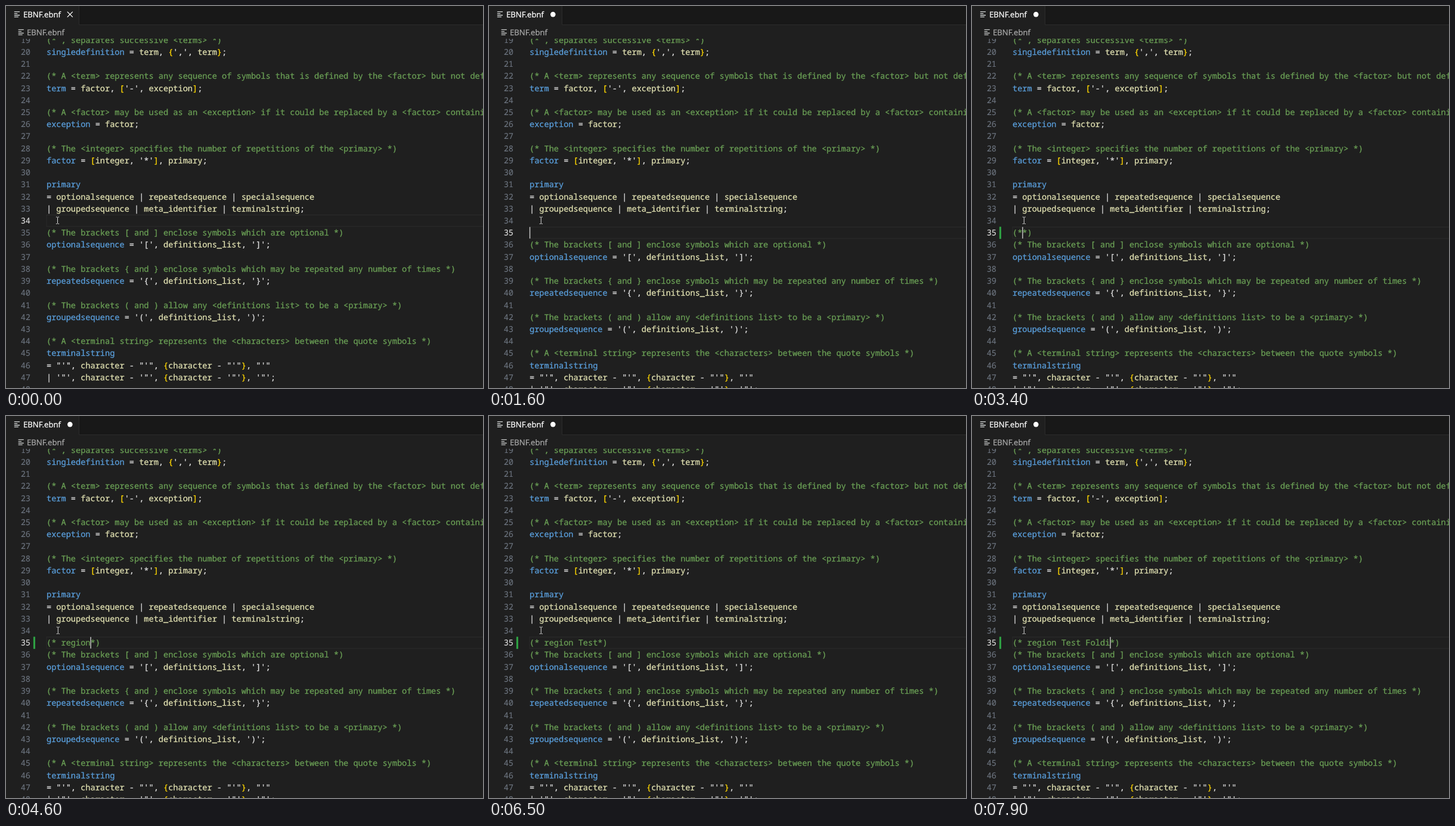
Animation of 800 by 641 pixels, one loop 8000 ms. Source, as an HTML page:

```html
<!DOCTYPE html>
<html lang="en">
<head>
<meta charset="utf-8">
<title>EBNF.ebnf</title>
<style>
  html, body { margin: 0; width: 100%; height: 100%; overflow: hidden; background: #1f1f1f; }
  svg { display: block; width: 100vw; height: 100vh; }
  text, tspan { fill: currentColor; stroke: currentColor; stroke-width: 0.3px; }
  text { white-space: pre; text-rendering: geometricPrecision; }
  .code { font: 13.625px "Noto Sans Mono", "DejaVu Sans Mono", monospace; color: #dcdcdc; }
  .ui { font: 13.1px "Open Sans", "Noto Sans", sans-serif; }
  .number { color: #6e7681; stroke-width: 0.1px; text-anchor: end; }
  .number.active { color: #e4e4e4; }
  .comment { color: #6a9f55; }
  .rule { color: #5a9fdc; }
  .name { color: #e2e2b2; }
  .bracket { color: #ffd700; }
</style>
</head>
<body>
<svg viewBox="0 0 800 641">
  <defs>
    <clipPath id="pane"><rect y="55" width="800" height="586"/></clipPath>
    <path id="fileIcon" d="M0 .7h9.2M0 3.6h5.4M0 6.5h9.2M0 9.4h7" stroke-width="1.3"/>
  </defs>
  <rect width="800" height="641" fill="#1f1f1f"/>
  <g clip-path="url(#pane)">
    <rect id="highlight" x="68" width="740" height="19.2" fill="none" stroke="#292929" stroke-width="1.3"/>
    <rect id="added" x="45.8" width="3.2" height="20.4" fill="#2ea043"/>
    <g id="numbers"></g>
    <g id="upper"></g>
    <g id="lower"></g>
    <text id="typed" x="68"></text>
    <rect id="caret" width="1.5" height="19.4" fill="#c4c4c4"/>
    <path id="pointer" d="M-2.6 -5.7h1.6l1 .8l1 -.8h1.6M0 -5v10M-2.6 5.7h1.6l1 -.8l1 .8h1.6" fill="none" stroke="#d8d8d8"/>
  </g>
  <rect x="122" width="678" height="31" fill="#181818"/>
  <path d="M122.5 0V31.5H800" fill="none" stroke="#2b2b2b"/>
  <use href="#fileIcon" x="13.8" y="9" stroke="#d4d7d6"/>
  <text class="ui" x="29" y="18.5" color="#fff">EBNF.ebnf</text>
  <path id="close" d="M102.8 9.6l9 9m0 -9l-9 9" stroke="#fff" stroke-width="1.3"/>
  <circle id="unsaved" cx="107.3" cy="14.1" r="4.3" fill="#fff"/>
  <use href="#fileIcon" x="20.6" y="39" stroke="#c4c6c5"/>
  <text class="ui" x="35" y="49" color="#a9a9a9">EBNF.ebnf</text>
</svg>
<script>
const LOOP = 8000, LEFT = 68, CHAR = 8.175, PITCH = 20.22;
const FIRST_LINE = 19, SPLIT = 35, ENTER = 1150, GUTTER_MARK = 1900;
const source = String.raw`(* , separates successive <terms> *)
singledefinition = term, {',', term};

(* A <term> represents any sequence of symbols that is defined by the <factor> but not defined *)
term = factor, ['-', exception];

(* A <factor> may be used as an <exception> if it could be replaced by a <factor> containing *)
exception = factor;

(* The <integer> specifies the number of repetitions of the <primary> *)
factor = [integer, '*'], primary;

primary
= optionalsequence | repeatedsequence | specialsequence
| groupedsequence | meta_identifier | terminalstring;

(* The brackets [ and ] enclose symbols which are optional *)
optionalsequence = '[', definitions_list, ']';

(* The brackets { and } enclose symbols which may be repeated any number of times *)
repeatedsequence = '{', definitions_list, '}';

(* The brackets ( and ) allow any <definitions list> to be a <primary> *)
groupedsequence = '(', definitions_list, ')';

(* A <terminal string> represents the <characters> between the quote symbols *)
terminalstring
= "'", character - "'", {character - "'"}, "'"
| '"', character - '"', {character - '"'}, '"';`.split("\n");

// Key presses: [time, text before the caret, text after it]
const keys = [[ENTER, "", ""], [2800, "(", ")"], [3100, "(*", "*)"]];
function type(text, times) {
  [...text].forEach((letter, i) =>
    keys.push([times[i], keys[keys.length - 1][1] + letter, "*)"]));
}
type(" region", [3700, 3850, 3980, 4110, 4240, 4370, 4500]);
type(" Test", [5000, 5250, 5400, 5600, 5800]);
type(" Foldi", [7000, 7250, 7400, 7550, 7700, 7850]);

const byId = id => document.getElementById(id);
const baseline = line => 81.9 + (line - 20) * PITCH;
const rowTop = line => baseline(line) - 14.8;
const show = (id, on) => byId(id).setAttribute("visibility", on ? "visible" : "hidden");

function place(id, attributes) {
  for (const key in attributes) byId(id).setAttribute(key, attributes[key]);
}

function addText(parent, tag, className, content) {
  const node = document.createElementNS("http://www.w3.org/2000/svg", tag);
  node.setAttribute("class", className);
  node.textContent = content;
  return parent.appendChild(node);
}

function tokenClass(token, offset) {
  if (token.startsWith("(*")) return "comment";
  if (/^\w/.test(token)) return offset ? "name" : "rule";
  return /^[[\]{}]/.test(token) ? "bracket" : "plain";
}

function addLine(content, line) {
  const text = addText(byId(line < SPLIT ? "upper" : "lower"), "text", "code", "");
  text.setAttribute("x", LEFT);
  text.setAttribute("y", baseline(line));
  const tokens = /\(\*.*|'[^']*'|"[^"]*"|\w+|[[\]{}]|[^\w'"[\]{}]+/g;
  for (const match of content.matchAll(tokens))
    addText(text, "tspan", tokenClass(match[0], match.index), match[0]);
}

source.forEach((content, i) => addLine(content, FIRST_LINE + i));
const numbers = [];
for (let line = FIRST_LINE; line < 50; line++) {
  const number = addText(byId("numbers"), "text", "code number", line);
  number.setAttribute("x", 41);
  number.setAttribute("y", baseline(line));
  numbers.push(number);
}

function render(time) {
  const entered = time >= ENTER;
  const active = entered ? SPLIT : SPLIT - 1;
  const [pressed, before, after] = keys.filter(key => key[0] <= time).pop() || [-700, "", ""];
  const top = rowTop(active);

  numbers.forEach((node, i) => node.classList.toggle("active", i + FIRST_LINE === active));
  place("lower", { transform: `translate(0 ${entered ? PITCH : 0})` });
  place("highlight", { y: top + 0.5 });
  place("added", { y: top });
  place("pointer", { transform: `translate(${entered ? 87.3 : 86.5} 359.8)` });
  place("caret", { x: LEFT + before.length * CHAR - 0.2, y: top + 0.4 });
  place("typed", { y: baseline(SPLIT), class: `code ${before === "(" ? "bracket" : "comment"}` });
  byId("typed").textContent = before + after;

  show("caret", (time - pressed) % 1000 < 500);
  show("added", time >= GUTTER_MARK);
  show("close", !entered);
  show("unsaved", entered);
}

const start = performance.now();
function tick() {
  render((performance.now() - start) % LOOP);
  requestAnimationFrame(tick);
}
tick();
</script>
</body>
</html>
```
